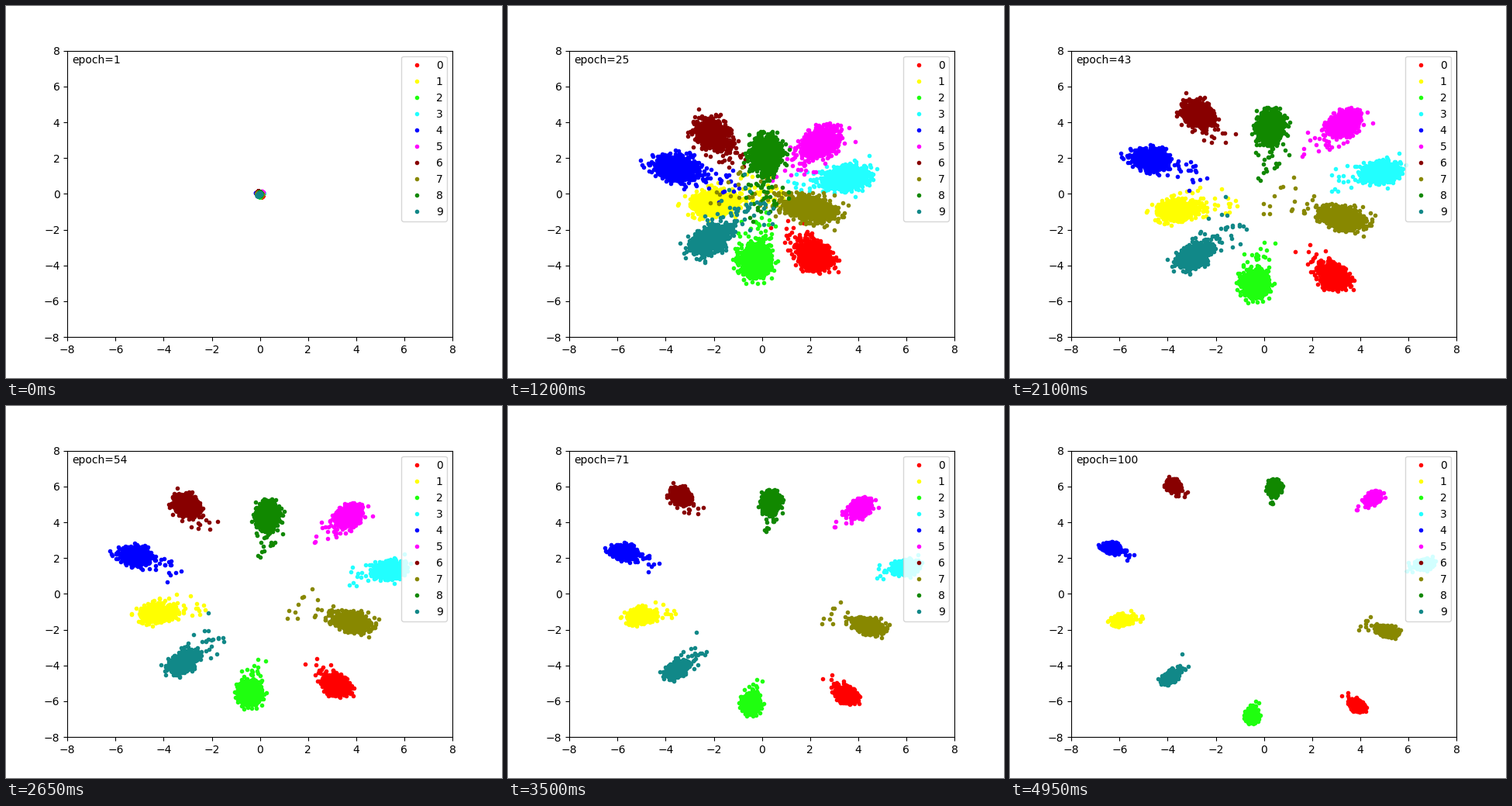
These frames come from a looping animation (640 by 480 pixels, 5 s). A matplotlib script:

```python
import numpy as np
import matplotlib.pyplot as plt
from matplotlib.animation import FuncAnimation

EPOCHS = 100
WARMUP = 17
COLORS = ['#ff0000', '#ffff00', '#1fff0f', '#22ffff', '#0000ff',
          '#ff00ff', '#880000', '#888800', '#118800', '#118888']

# Classes counter-clockwise, evenly spaced, with their distance from the
# middle at the end of the warm-up and at the last epoch.
RING = [3, 5, 8, 6, 4, 1, 9, 2, 0, 7]
EARLY = [2.6, 2.8, 1.1, 3.0, 3.0, 0.8, 2.5, 2.8, 3.1, 1.2]
FINAL = [6.85, 7.04, 5.97, 7.14, 6.86, 6.11, 6.08, 6.81, 7.36, 5.52]

POINTS = 1000
STRAGGLERS = 80
rng = np.random.default_rng(4)


class Cluster:
    def __init__(self, slot):
        angle = np.radians(13.9 + 36 * slot)
        self.out = np.array([np.cos(angle), np.sin(angle)])
        self.side = np.array([-self.out[1], self.out[0]])
        self.early, self.final = EARLY[slot], FINAL[slot]
        self.cloud = rng.normal(0, 0.34, (POINTS, 2))
        self.rank = rng.uniform(0, 1, STRAGGLERS)
        self.drift = rng.normal(0, 0.22, STRAGGLERS)

    def points(self, epoch):
        grow = max(0.04, min(1, (epoch - 1) / (WARMUP - 1)) ** 0.4)
        # Falls from 1 at the end of the warm-up to 0 at the last epoch.
        left = min(1, np.log(EPOCHS / epoch) / np.log(EPOCHS / WARMUP)) ** 1.08

        size = min(1, 0.36 + 1.07 * left)
        stretch = 6.9 / self.final
        along = 1.2 * size * stretch * self.cloud[:, 0]
        across = 0.88 * size * self.cloud[:, 1]

        # Stragglers trail towards the middle; weaker classes trail further.
        reach = (8.7 - self.final) * min(1.25, 0.48 + 1.5 * left)
        pull = reach * self.rank ** (8 * np.exp(-2 * left))
        along[:STRAGGLERS] -= pull
        across[:STRAGGLERS] += pull * self.drift

        along += self.final + (self.early - self.final) * left
        return grow * (np.outer(along, self.out) + np.outer(across, self.side))


clusters = [Cluster(RING.index(k)) for k in range(len(COLORS))]

fig, ax = plt.subplots(figsize=(6.4, 4.8), dpi=100)
fig.subplots_adjust(left=79.2 / 640)
ax.set_xlim(-8, 8)
ax.set_ylim(-8, 8)
lines = [ax.plot([], [], '.', color=c, label=str(k))[0]
         for k, c in enumerate(COLORS)]
ax.legend(loc='upper right')
label = ax.text(-7.8, 7.3, '')


def update(i):
    epoch = i + 1
    for line, cluster in zip(lines, clusters):
        line.set_data(*cluster.points(epoch).T)
    label.set_text(f'epoch={epoch}')
    return [*lines, label]


anim = FuncAnimation(fig, update, frames=EPOCHS, interval=50,
                     repeat=True, repeat_delay=0)
plt.show()
```
